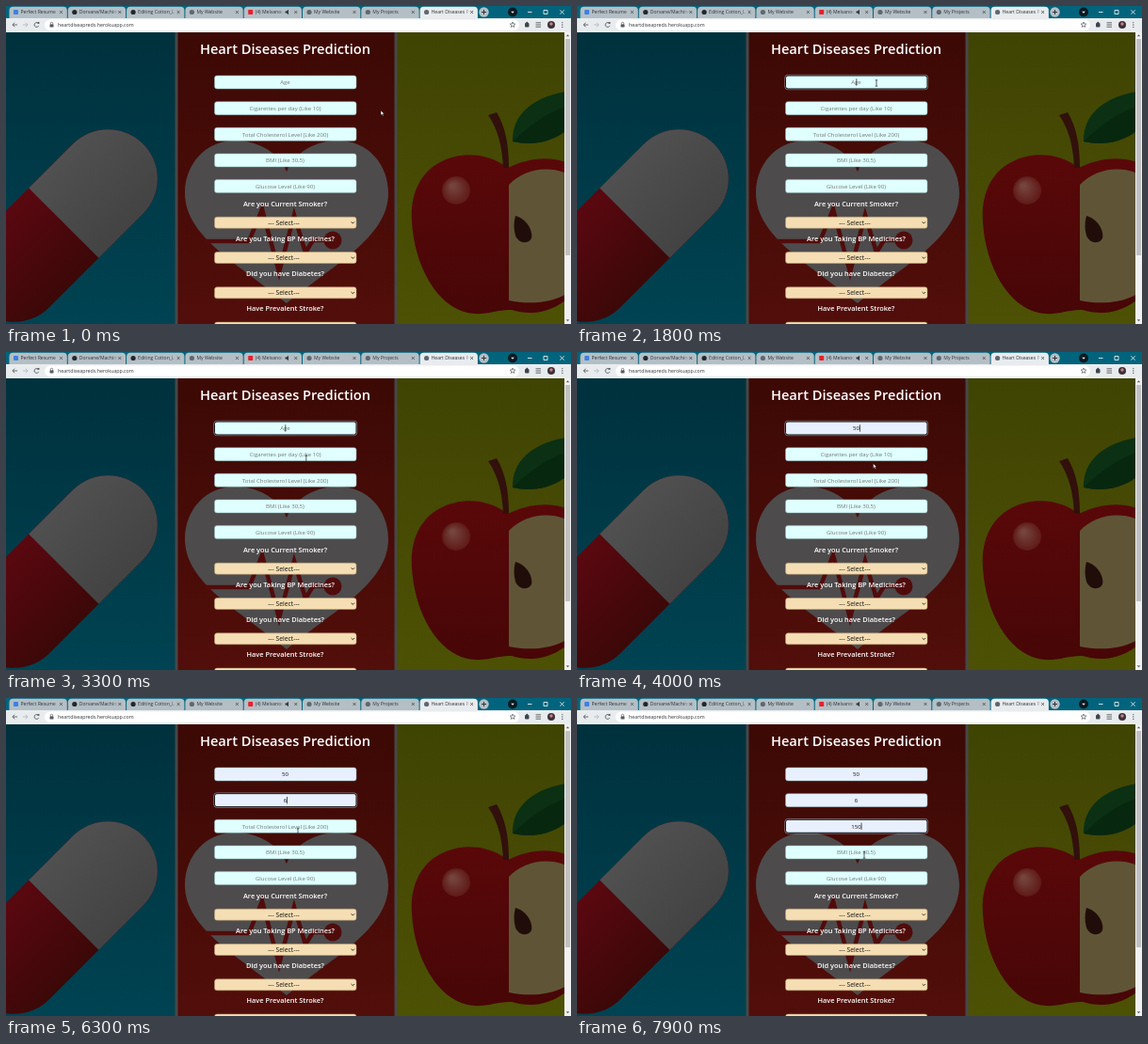
Write an HTML page with a canvas that moves like this. It is 600x338 px and loops after 8000 ms.

```html
<!DOCTYPE html>
<html lang="en">
<head>
<meta charset="utf-8">
<title>Heart Diseases Prediction</title>
<style>
html, body { margin: 0; width: 100%; height: 100%; overflow: hidden; background: #fff; }
canvas, svg { position: absolute; left: 0; top: 0; width: 600px; height: 338px; }
text { font-family: "Open Sans", "Noto Sans", sans-serif; white-space: pre; }
</style>
</head>
<body>
<canvas id="stage" width="600" height="338"></canvas>
<svg id="type" viewBox="0 0 600 338"></svg>
<script>
const LOOP = 8000;
const MID = 296.5;
const ctx = document.getElementById('stage').getContext('2d');
const svg = document.getElementById('type');

// ---------- helpers ----------
function node(name, attrs, parent = svg) {
  const el = document.createElementNS('http://www.w3.org/2000/svg', name);
  for (const k in attrs) el.setAttribute(k, attrs[k]);
  return parent.appendChild(el);
}
function label(str, x, y, size, fill, anchor = 'start', weight = 400) {
  const el = node('text', { x, y, fill, 'font-size': size, 'text-anchor': anchor, 'font-weight': weight });
  el.textContent = str;
  return el;
}
function rect(x, y, w, h, fill) {
  ctx.fillStyle = fill;
  ctx.fillRect(x, y, w, h);
}
function round(x, y, w, h, r, fill, stroke, lw = 1) {
  ctx.beginPath();
  ctx.roundRect(x, y, w, h, r);
  if (fill) { ctx.fillStyle = fill; ctx.fill(); }
  if (stroke) { ctx.strokeStyle = stroke; ctx.lineWidth = lw; ctx.stroke(); }
}
function disc(x, y, r, fill) {
  ctx.beginPath();
  ctx.arc(x, y, r, 0, Math.PI * 2);
  ctx.fillStyle = fill;
  ctx.fill();
}
function line(points, stroke, lw = 1) {
  ctx.beginPath();
  points.forEach(([x, y]) => ctx.lineTo(x, y));
  ctx.strokeStyle = stroke;
  ctx.lineWidth = lw;
  ctx.stroke();
}
function shape(d, fill) {
  ctx.fillStyle = fill;
  ctx.fill(new Path2D(d));
}
function fade(y0, y1, a, b) {
  const g = ctx.createLinearGradient(0, y0, 0, y1);
  g.addColorStop(0, a);
  g.addColorStop(1, b);
  return g;
}

// ---------- browser frame ----------
const tabs = [
  ['Perfect Resume', '#3b82e6', 'sq'], ['Dorvane/Machine', '#22272c'], ['Editing Cotton_L', '#22272c'],
  ['My Website', '#5f6870'], ['(4) Melvanoo', '#e8202a', 'sq'], ['My Website', '#5f6870'],
  ['My Projects', '#5f6870'], ['Heart Diseases Pr', '#5f6870']
];
const tabX = i => 5 + i * 62.3;

function cross(x, y, r, color) {
  line([[x - r, y - r], [x + r, y + r]], color, 0.8);
  line([[x - r, y + r], [x + r, y - r]], color, 0.8);
}
function drawFrame() {
  rect(0, 0, 600, 14, '#02647c');
  tabs.forEach(([, color, kind], i) => {
    const x = tabX(i), active = i === 7;
    round(x - 1.5, 0.8, 61.3, 14, [4, 4, 0, 0], active ? '#e9ecee' : '#b4bfc5');
    if (kind) round(x + 3, 4, 5, 5, 0.8, color);
    else disc(x + 5.5, 6.5, 2.6, color);
    cross(x + 53.5, 6.5, 1.4, '#3c4043');
  });
  // sound mark on the playing tab
  shape('M296.5 5.5h1.5l2-1.8v5.6l-2-1.8h-1.5z', '#30363a');
  disc(507.5, 6.5, 5.2, '#b4bfc5');
  line([[507.5, 4], [507.5, 9]], '#2c3438');
  line([[505, 6.5], [510, 6.5]], '#2c3438');
  disc(538, 6.5, 5, '#0c1a20');
  shape('M536.2 5.7h3.6l-1.8 2.1z', '#fff');
  line([[554, 6.5], [558.5, 6.5]], '#fff', 0.8);
  round(571, 4.5, 4, 4, 0, null, '#fff', 0.8);
  cross(590.5, 6.5, 2.1, '#fff');

  rect(0, 13, 600, 15, '#e9ecee');
  round(41, 14.5, 504, 11.5, 5.7, '#fff');
  line([[12, 20], [7, 20]], '#555b60', 0.9);
  line([[9.2, 17.7], [6.9, 20], [9.2, 22.3]], '#555b60', 0.9);
  line([[18, 20], [23, 20]], '#b4b8bc', 0.9);
  line([[20.8, 17.7], [23.1, 20], [20.8, 22.3]], '#b4b8bc', 0.9);
  ctx.beginPath();
  ctx.arc(32.5, 20, 2.4, 0.4, 5.6);
  ctx.strokeStyle = '#555b60';
  ctx.lineWidth = 0.9;
  ctx.stroke();
  rect(33.5, 17, 1.9, 1.9, '#555b60');
  round(46.5, 19.4, 4, 3.2, 0.5, '#555b60');
  round(47.3, 17.3, 2.4, 3, 1.1, null, '#555b60', 0.7);
  ctx.beginPath();
  for (let i = 0; i < 10; i++) {
    const a = i * Math.PI / 5 - Math.PI / 2, r = i % 2 ? 1.3 : 3;
    ctx.lineTo(538 + r * Math.cos(a), 20 + r * Math.sin(a));
  }
  ctx.closePath();
  ctx.stroke();
  round(551, 18, 4.5, 4.5, 1, '#3f464b');
  disc(553.3, 17.8, 1.1, '#3f464b');
  for (const y of [17.8, 20, 22.2]) line([[562.5, y], [568, y]], '#3f464b', 0.8);
  disc(579, 20, 4, '#3d2f3c');
  disc(579, 19, 1.7, '#c98278');
  for (const y of [17.6, 20, 22.4]) disc(590.8, y, 0.7, '#555b60');

  rect(593, 28, 7, 310, '#f1f1f1');
  rect(594, 35, 5, 230, '#c1c1c1');
  shape('M594.8 32.2h3.4l-1.7-2z', '#606060');
  shape('M594.8 333.3h3.4l-1.7 2z', '#606060');
}

// ---------- page backdrop ----------
function drawCapsule() {
  ctx.save();
  ctx.translate(108, 184);
  ctx.rotate(Math.PI * 0.75);
  round(-53, -52.5, 246, 105, 52.5, fade(-52, 52, '#3c0808', '#5a0810'));
  ctx.clip();
  rect(-60, -60, 126, 120, fade(-52, 52, '#444344', '#515051'));
  ctx.restore();
}
function drawHeart() {
  shape('M298 176C288 153 265 143 243 143C212 143 190 168 190 199C190 246 250 276 298 316' +
    'C346 276 406 246 406 199C406 168 384 143 353 143C331 143 308 153 298 176Z', '#4e4b4c');
  const red = '#500c0b';
  line([[211, 250], [258, 250], [272, 216], [290, 283], [306, 222], [318, 262], [326, 249], [347, 249]], red, 4.5);
  disc(347, 249, 9.5, red);
}
function drawApple() {
  shape('M533 172C512 156 484 154 461 166C438 178 429 203 431 230C434 277 458 319 490 326' +
    'C508 330 522 322 537 323C556 329 579 327 600 308L600 168C577 158 553 162 533 172Z',
    fade(155, 328, '#5a0809', '#470607'));
  const glow = ctx.createRadialGradient(474, 191, 2, 478, 196, 15);
  glow.addColorStop(0, '#75443d');
  glow.addColorStop(1, '#5f1a17');
  disc(478, 196, 15, glow);
  shape('M534 190C550 173 577 168 600 180L600 303C580 317 554 317 534 313Z', '#5f5536');
  shape('M541 223C552 226 560 238 558 247C554 254 544 252 541 244C539 237 539 230 541 223Z', '#200d09');
  shape('M512 116L521 113C530 128 534 146 534 172L528 172C527 150 523 132 512 116Z', '#32100b');
  shape('M538 144C537 118 556 96 600 90L600 128C579 147 557 148 538 144Z', '#0b3013');
  shape('M538 144C558 125 576 112 600 105L600 128C579 147 557 148 538 144Z', '#08270f');
}
function drawBackdrop() {
  ctx.save();
  ctx.beginPath();
  ctx.rect(0, 28, 593, 310);
  ctx.clip();
  rect(0, 28, 180, 310, fade(28, 338, '#00313d', '#004352'));
  rect(180, 28, 236, 310, fade(28, 338, '#3c0905', '#520e0a'));
  rect(414, 28, 180, 310, fade(28, 338, '#404403', '#4d5104'));
  drawCapsule();
  drawHeart();
  drawApple();
  rect(179.5, 28, 3, 310, '#474748');
  rect(412.5, 28, 3, 310, '#474748');
  ctx.restore();
}

// ---------- form ----------
const hints = ['Age', 'Cigarettes per day (Like 10)', 'Total Cholesterol Level (Like 200)',
  'BMI (Like 30,5)', 'Glucose Level (Like 90)'];
const questions = ['Are you Current Smoker?', 'Are you Taking BP Medicines?',
  'Did you have Diabetes?', 'Have Prevalent Stroke?'];
const inputY = i => 74 + i * 27.65;
const selectY = i => 224.2 + i * 37.3;

function drawForm(state) {
  hints.forEach((_, i) => {
    const y = inputY(i);
    round(221.5, y, 150.5, 14, 2.5, state.values[i] ? '#e8f0fe' : '#e0ffff', '#8fb4b6', 0.5);
    if (state.focus === i) {
      round(220.8, y - 0.7, 151.9, 15.4, 3, null, '#b9b9b9', 0.6);
      round(221.5, y, 150.5, 14, 2.5, null, '#14181e', 1);
    }
  });
  questions.forEach((_, i) => {
    const y = selectY(i);
    round(221.5, y, 150.5, 12, 2.5, '#f5deb3', '#b99d70', 0.5);
    line([[366.6, y + 5.2], [368.3, y + 6.9], [370, y + 5.2]], '#222', 0.9);
  });
}

// ---------- static text ----------
const fadeMask = node('linearGradient', { id: 'tail', x1: 0, x2: 1 }, node('defs', {}));
node('stop', { offset: 0.85, 'stop-color': '#fff' }, fadeMask);
node('stop', { offset: 1, 'stop-color': '#000' }, fadeMask);
tabs.forEach(([name], i) => {
  const x = tabX(i) + 10.5, w = i === 4 ? 30 : 41;
  const mask = node('mask', { id: 'm' + i, maskUnits: 'userSpaceOnUse', x, y: 0, width: w, height: 13 });
  node('rect', { x, y: 0, width: w, height: 13, fill: 'url(#tail)' }, mask);
  label(name, x, 8.4, 5.1, '#2b3235').setAttribute('mask', `url(#m${i})`);
});
label('heartdiseapreds.herokuapp.com', 55, 22, 5.3, '#303438');
label('Heart Diseases Prediction', MID, 51.3, 14.65, '#fff', 'middle', 600);
questions.forEach((q, i) => {
  label(q, MID, 212.8 + i * 37.2, 7.4, '#fff', 'middle', 600);
  label('--- Select---', 295, selectY(i) + 8.4, 6.8, '#111', 'middle');
});
const fields = hints.map((h, i) => label(h, MID, inputY(i) + 9.3, 6.05, '#757575', 'middle'));
const caret = node('rect', { width: 0.7, height: 7.4, fill: '#111' });
const arrow = node('path', {
  d: 'M0 0V5.2L1.3 4.1L2.1 6L3 5.6L2.2 3.8H3.8Z', fill: '#fff', stroke: '#111', 'stroke-width': 0.5
});
const beam = node('path', {
  d: 'M-1.3 -3.2H1.3M0 -3.2V3.2M-1.3 3.2H1.3', fill: 'none', stroke: '#222', 'stroke-width': 0.7
});

// ---------- motion ----------
// time, field, value
const typing = [
  [1800, 0, ''], [2300, 0, '22'], [3000, 0, ''], [3400, 0, '5'], [3700, 0, '50'],
  [4300, 1, ''], [6000, 1, '6'], [7000, 2, ''], [7300, 2, '1'], [7400, 2, '15'], [7600, 2, '150']
];
const route = [
  [0, 398, 111], [500, 402, 100], [1100, 412, 87], [1400, 380, 84], [1800, 318, 82], [2100, 318, 90],
  [2500, 324, 104], [3000, 320, 112], [4000, 314.5, 118.5], [4300, 304, 111], [4900, 305, 121],
  [5600, 308, 130], [6300, 310, 142], [6800, 304, 138], [7100, 303, 137], [7900, 305, 167], [8000, 305, 167]
];
function pointer(t) {
  let i = 0;
  while (i < route.length - 2 && route[i + 1][0] <= t) i++;
  const [t0, x0, y0] = route[i], [t1, x1, y1] = route[i + 1];
  const u = (t - t0) / (t1 - t0), e = u * u * (3 - 2 * u);
  return [x0 + (x1 - x0) * e, y0 + (y1 - y0) * e];
}
function stateAt(t) {
  const s = { values: ['', '', '', '', ''], focus: -1, since: 0 };
  for (const [at, field, value] of typing) {
    if (at > t) break;
    s.values[field] = value;
    s.focus = field;
    s.since = at;
  }
  return s;
}

function render(t) {
  const s = stateAt(t);
  const preview = t >= 2300 && t < 3000;
  drawBackdrop();
  drawFrame();
  drawForm(s);

  fields.forEach((el, i) => {
    const v = s.values[i];
    el.textContent = v || hints[i];
    el.setAttribute('fill', v ? '#111' : '#757575');
    el.setAttribute('font-size', preview && i === 0 ? 5.2 : 6.05);
  });
  const lit = s.focus >= 0 && !preview && (t - s.since) % 1000 < 500;
  caret.style.display = lit ? '' : 'none';
  if (lit) {
    const n = s.values[s.focus].length;
    caret.setAttribute('x', MID + n * 1.73);
    caret.setAttribute('y', inputY(s.focus) + 3.3);
  }

  const [x, y] = pointer(t);
  const listOpen = t >= 1900 && t < 3000;
  const over = !listOpen && x > 221 && x < 372 &&
    hints.some((_, i) => y > inputY(i) && y < inputY(i) + 14);
  arrow.style.display = over ? 'none' : '';
  beam.style.display = over ? '' : 'none';
  (over ? beam : arrow).setAttribute('transform', `translate(${x} ${y})`);
}

const start = performance.now();
function tick(now) {
  const t = Math.max(0, now - start) % LOOP;
  render(Math.floor(t / 100) * 100);
  requestAnimationFrame(tick);
}
render(0);
requestAnimationFrame(tick);
</script>
</body>
</html>
```
